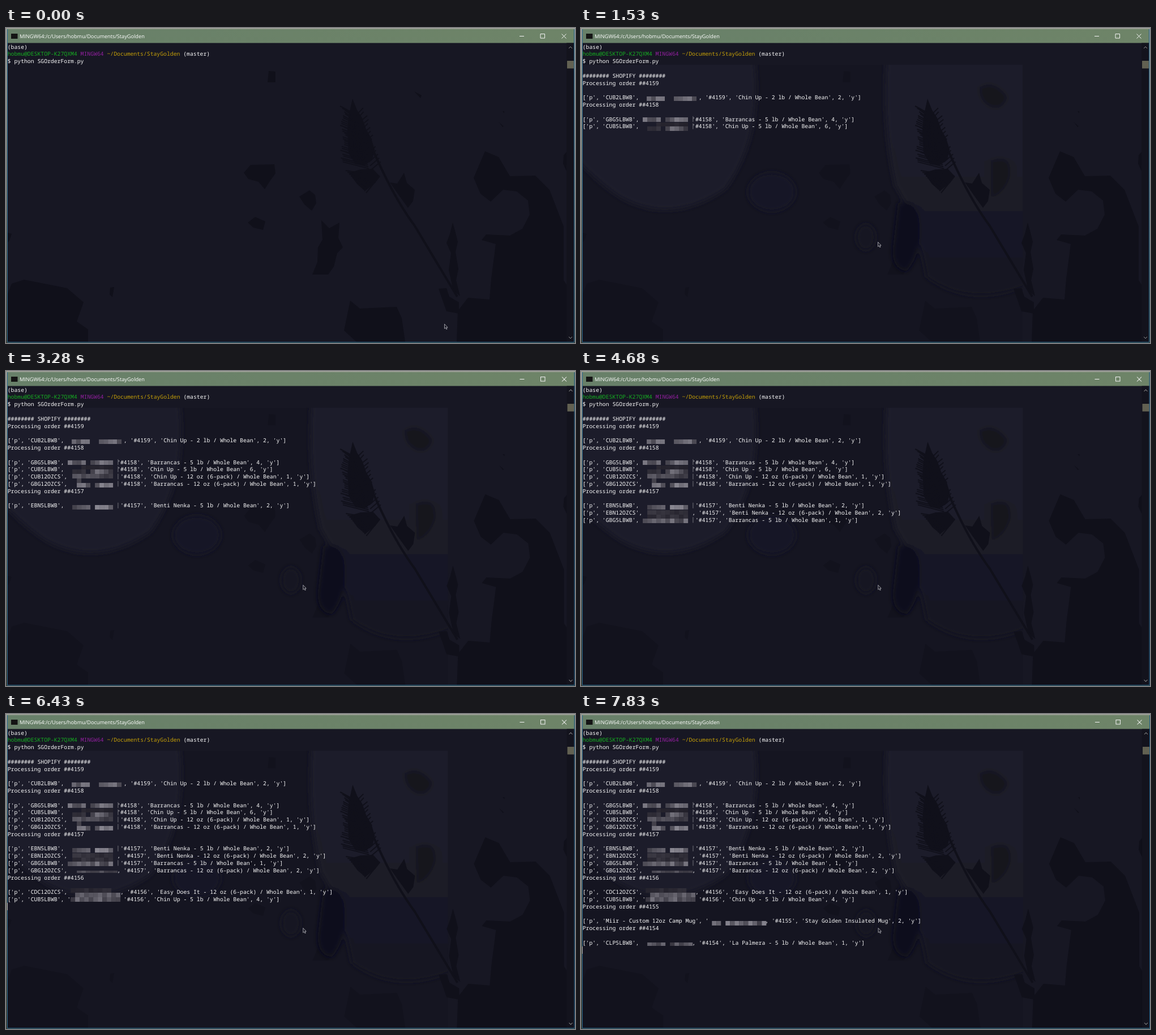
Animation of 1005x557 px, one loop 8000 ms. Source, as an HTML page:

```html
<!DOCTYPE html>
<html lang="en">
<head>
<meta charset="utf-8">
<title>Terminal</title>
<style>
  html, body { margin: 0; width: 100%; height: 100%; overflow: hidden; background: #171723; }
  svg { display: block; }
  text { white-space: pre; text-rendering: geometricPrecision; }
  .console { font: 500 9.775px "Noto Sans Mono", monospace; fill: #fafafa; }
  .title { font: 9.2px "Open Sans", sans-serif; fill: #fff; }
</style>
</head>
<body>
<svg width="1005" height="557" viewBox="0 0 1005 557">
  <defs>
    <linearGradient id="side" x2="0" y2="1">
      <stop stop-color="#9b9f95"/><stop offset=".5" stop-color="#70746c"/><stop offset="1" stop-color="#3c4038"/>
    </linearGradient>
    <linearGradient id="bar"><stop stop-color="#688069"/><stop offset="1" stop-color="#6e8468"/></linearGradient>
    <linearGradient id="glow" x2="0" y2="1">
      <stop stop-color="#1c1b2a"/><stop offset=".6" stop-color="#1a1a28"/><stop offset="1" stop-color="#151522"/>
    </linearGradient>
    <clipPath id="litArea"><path d="M3 65H780V555H3z"/></clipPath>
    <filter id="soft"><feGaussianBlur stdDeviation="5"/></filter>
  </defs>
  <rect width="1005" height="557" fill="url(#side)"/>
  <g id="stage">
    <rect x="2" y="2" width="1002" height="553.5" fill="#171723"/>
    <g fill="#10101a">
      <path d="M464 76l12 1v19h-14zM420 256l12-14 42-1 2 16-10 14-9 14-11-13-18-5zM518 298l18-11 10 8 2 15-8 13-13-11zM427 344l13-10 18 8-4 15-17-4z"/>
      <path d="M557 340l14 14 18-10-2 27 8 17-10 10-6 24-10 14h-28l9-22 1-26 8-14zM721 112l13 7-2 5zM870 166l9 8-2 1zM877 147h3v4zM184 459l7-1-3 18-5-5zM3 362l7 2-4 12-3 3z"/>
      <path d="M846 218l24 10 20 34 45-1 25 25 25 65v95l5 8V555H796l2-55 18-23 38 3 3-36 8-62-25-7 8-10 42 2 22-12 13-25-3-25-20-16-24-3-22 21-18-14-12-28z"/>
      <path d="M10 452l22-7 76 15 29 25-12 34 20 14v22H3V470zM608 482l17 14 65-3 9 20 6 42h-86l-22-20zM985 225l5-6v34l-6-13z"/>
    </g>
    <g id="lit" clip-path="url(#litArea)">
      <path d="M3 65H780V555H3z" fill="#151521" opacity=".6"/>
      <g filter="url(#soft)">
        <path d="M-20 45H305Q325 190 255 285Q160 350 70 300Q30 275 -20 220z" fill="#1b1b29"/>
        <path d="M540 45H800V450Q690 500 610 440Q590 330 555 280Q530 170 540 45z" fill="url(#glow)"/>
        <ellipse cx="337" cy="290" rx="42" ry="34" fill="#181825"/>
        <ellipse cx="503" cy="370" rx="17" ry="23" fill="#171824"/>
        <path d="M560 310Q595 300 598 345Q602 400 575 430Q545 425 552 380z" fill="#11111c"/>
        <path d="M704 105Q730 90 753 122Q745 146 725 140Q703 130 704 105zM724 235Q760 220 758 260Q750 290 725 300z" fill="#13131f"/>
      </g>
    </g>
    <g fill="#10101a">
      <path d="M612 125l8 20 9 14 7 20 9 16 6 20-4 18-14 10-16-2-12-20-2-40 2-24zM606 256l20-6 22-1 12 13-8 12-18 14-14-12z"/>
      <path d="M703 256l5 18 14 12-3 20-9 12-16-22-16-23 13 2z"/>
      <path d="M789 344l5 18 4 16-4 18 5 30-4 20 7 28-12-10-8-36 4-30-8-18 6-16zM764 461l14-1 5 15 17 10v20l-22-4z"/>
    </g>
    <path d="M650 220Q685 300 722 350L797 475" fill="none" stroke="#10101a" stroke-width="4"/>
    <path id="bristles" fill="none" stroke="#10101a" stroke-width="2"/>

    <path d="M2 2H1004V26.5H2z" fill="url(#bar)"/>
    <path d="M9 10h11.5v9H9z" fill="#141414"/>
    <text class="title" x="24" y="18.2">MINGW64:/c/Users/hobmu/Documents/StayGolden</text>
    <path d="M907 14.5h8M944 10.5h7.5v7.5H944zM981.5 10.5l8 8m0-8l-8 8" fill="none" stroke="#f4f4f4"/>
    <path d="M990 26.5h13.5V555H990z" fill="#13131d"/>
    <path d="M991 58h12.5v13.5H991z" fill="#626152"/>
    <path d="M994 36l3-3 3 3M994 546l3 3 3-3" fill="none" stroke="#8f8f8f"/>
    <path d="M2.5 2V555.5H1003.5V2" fill="none" stroke="#205f88"/>

    <g id="console" class="console"></g>
    <path id="caret" d="M2 0h1v13h-1z" fill="#a8a8b0"/>
    <path id="mouse" d="M.5 .5V8.6L2.4 6.9L3.8 9.8L5 9.2L3.8 6.4H6z" fill="#181824" stroke="#c4c4ca" stroke-width=".75"/>
  </g>
</svg>
<script>
const LOOP = 8000, FIRST = 130, STEP = 350, LINE = 12.8;
const $ = id => document.getElementById(id);
const random = n => { const v = Math.sin(n * 127.1) * 43758.5453; return v - Math.floor(v); };

function add(parent, tag, attrs, content = '') {
  const el = document.createElementNS('http://www.w3.org/2000/svg', tag);
  for (const key in attrs) el.setAttribute(key, attrs[key]);
  el.textContent = content;
  return parent.appendChild(el);
}

const groups = [];
function row(step, line, content) {
  const g = add($('console'), 'g');
  groups.push({ g, step, line });
  const text = add(g, 'text', { x: 2.7, y: 36.5 + LINE * line }, content);
  return { g, text };
}

// Mosaic strip: x, y, number of blocks, height, brightness
function mosaic(g, x, y, count, height = 8, level = 1) {
  for (let i = 0; i < count; i++) {
    const v = Math.round(32 + level * (30 + 75 * random(x + y * 3 + i)));
    add(g, 'rect', { x: x + 8 * i, y, width: 8, height, fill: `rgb(${v},${v - 2},${v + 8})` });
  }
}

// The hidden part runs from the end of `start` to column `col`
function item(step, line, start, col, rest, strips, edge) {
  const { g } = row(step, line, `['p', '${start}`.padEnd(col) + rest + ", 'y']");
  strips.forEach(s => mosaic(g, ...s));
  if (edge) add(g, 'rect', { x: 197, y: 28 + LINE * line, width: 1.5, height: 10, fill: '#55555f' });
}
const order = (step, line, number) => row(step, line, 'Processing order ##' + number);

row(-1, 0, '(base)');
const prompt = row(-1, 1, '').text;
[['hobmu@DESKTOP-K27QXM4 ', '#16ad22'], ['MINGW64 ', '#92209f'], ['~/Documents/StayGolden ', '#c6a008'], ['(master)', '#fafafa']]
  .forEach(([part, fill]) => add(prompt, 'tspan', { fill }, part));
row(-1, 2, '$ python SGOrderForm.py');
row(0, 4, '######## SHOPIFY ########');
order(0, 5, 4159);
item(0, 7, "CUB2LBWB',", 35, ", '#4159', 'Chin Up - 2 lb / Whole Bean', 2", [[116, 121, 4], [164, 121, 5]]);
order(1, 8, 4158);
item(1, 10, "GBG5LBWB',", 33, "'#4158', 'Barrancas - 5 lb / Whole Bean', 4", [[109, 158, 4], [149, 158, 5]], true);
item(3, 11, "CUB5LBWB',", 33, "'#4158', 'Chin Up - 5 lb / Whole Bean', 6", [[133, 167, 7, 7, .1], [117, 174, 3, 8, .4], [149, 174, 5, 8, .8]], true);
item(5, 12, "CUB12OZCS',", 34, "'#4158', 'Chin Up - 12 oz (6-pack) / Whole Bean', 1", [[117, 182, 9, 8, .7], [125, 190, 1, 8, .5]], true);
item(7, 13, "GBG12OZCS',", 34, "'#4158', 'Barrancas - 12 oz (6-pack) / Whole Bean', 1", [[125, 198, 3], [157, 198, 4]], true);
order(9, 14, 4157);
item(9, 16, "EBN5LBWB',", 34, "'#4157', 'Benti Nenka - 5 lb / Whole Bean', 2", [[117, 237, 4], [157, 237, 4]], true);
item(11, 17, "EBN12OZCS',", 33, ", '#4157', 'Benti Nenka - 12 oz (6-pack) / Whole Bean', 2", [[117, 246, 9, 8, .25], [117, 254, 9, 7, .25]]);
item(13, 18, "GBG5LBWB',", 34, "'#4157', 'Barrancas - 5 lb / Whole Bean', 1", [[109, 261, 10]], true);
item(15, 19, "GBG12OZCS',", 33, ", '#4157', 'Barrancas - 12 oz (6-pack) / Whole Bean', 2", [[125, 277, 9, 4, .6]]);
order(16, 20, 4156);
item(16, 22, "CDC12OZCS',", 34, ", '#4156', 'Easy Does It - 12 oz (6-pack) / Whole Bean', 1", [[114, 308, 9, 8, .15], [122, 316, 10, 8, .8]]);
item(17, 23, "CUB5LBWB', '", 35, "'#4156', 'Chin Up - 5 lb / Whole Bean', 4", [[114, 324, 11, 8, .8]]);
order(19, 24, 4155);
item(19, 26, "Miir - Custom 12oz Camp Mug', '", 55, ", '#4155', 'Stay Golden Insulated Mug', 2", [[231, 366, 2], [255, 366, 9]]);
order(21, 27, 4154);
item(21, 29, "CLP5LBWB',", 33, ", '#4154', 'La Palmera - 5 lb / Whole Bean', 1", [[117, 404, 4, 6, .8], [157, 404, 5, 6, .8]]);

let bristles = '';
for (let i = 0; i < 30; i++) {
  const y = 140 + i * 3.4, x = 612 + i;
  bristles += `M${x} ${y + 10}L${590 + 10 * random(i)} ${y - 2}`;
  if (i % 2) bristles += `M${x + 4} ${y + 12}l${10 + 8 * random(i + 50)} -14`;
  if (i < 13) bristles += `M660 262L${600 + i * 3} ${252 + i * 3.3}`;
}
$('bristles').setAttribute('d', bristles);

function draw(now) {
  const step = Math.floor((now % LOOP - FIRST) / STEP);
  let last = 0;
  for (const { g, step: shownAt, line } of groups) {
    const visible = step >= shownAt;
    g.style.display = visible ? '' : 'none';
    if (visible) last = line;
  }
  $('caret').style.display = step % 4 >= 2 ? '' : 'none';
  $('caret').setAttribute('transform', `translate(0 ${Math.round(26.5 + LINE * (last + 1))})`);
  $('lit').style.display = step < 0 ? 'none' : '';
  $('mouse').setAttribute('transform', step < 0 ? 'translate(774 523)' : 'translate(524 378)');
  // The window creeps wider in two small jumps
  $('stage').setAttribute('transform', `scale(${1 + (step >= 9) * .0005 + (step >= 19) * .0005} 1)`);
  requestAnimationFrame(() => draw(performance.now()));
}
draw(performance.now());
</script>
</body>
</html>
```
